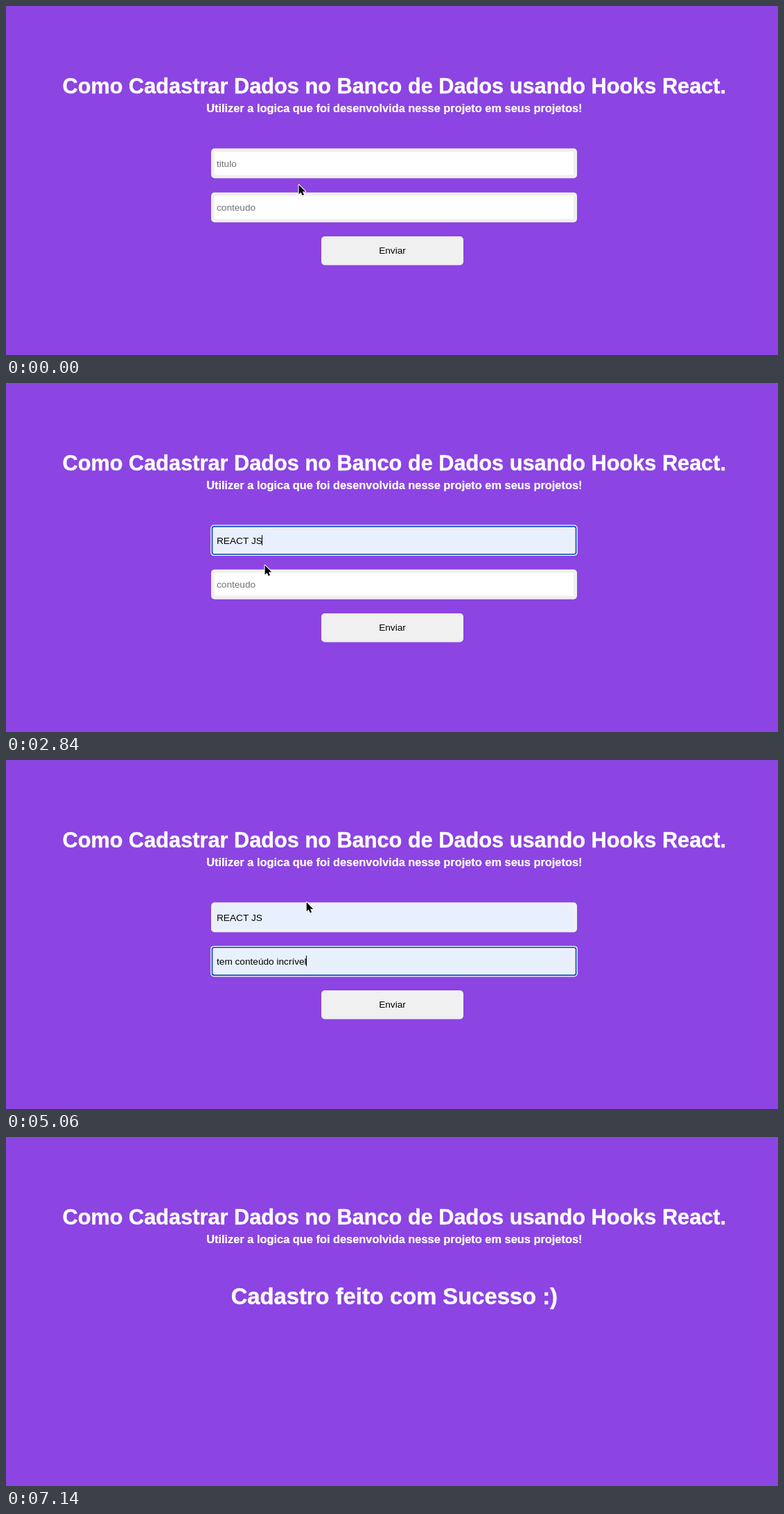
Animation, 1114 px wide and 503 px high, one loop 7.59 s. Source, as an HTML page with a canvas:

```html
<!DOCTYPE html>
<html lang="pt">
<head>
<meta charset="utf-8">
<title>Cadastro</title>
<style>
  html, body { margin: 0; height: 100%; overflow: hidden; background: #8c44e3; }
  canvas { display: block; }
</style>
</head>
<body>
<canvas id="stage" width="1114" height="503"></canvas>
<script>
const ctx = document.getElementById('stage').getContext('2d');
const LOOP = 7590, TICK = 148.6; // ms
const PURPLE = '#8c44e3', GREY = '#f0f0f0', AUTOFILL = '#e8f0fe';
const SANS = '"Liberation Sans", Arial, sans-serif';
const ZOOM = 1.024, CENTER = 560.3;
const INPUT_FONT = `${40 / 3 * ZOOM}px ${SANS}`;
const ROW = 33.6, POPUP_PAD = 7.8;

// Moments of the story, in ticks
const FOCUS_TITLE = 12, OPEN_TITLE = 13, PICK_TITLE = 19;
const FOCUS_BODY = 23, OPEN_BODY = 24, PICK_BODY = 33;
const CLICK_SEND = 39, SUCCESS = 40;

const field = (y, hint) => ({ x: 296, y, w: 528, h: 43, hint });
const popupAt = (y, rows) => ({ x: 296.3, y, w: 179, h: 216.7, rows });

const title = field(205.3, 'titulo');
const body = field(268.7, 'conteudo');
const button = { x: 455, y: 332, w: 205, h: 41.5 };
const titlePopup = popupAt(248.5, ['REACT JS', 'React', 'Hooks', 'dgdg', 'scsc', 'fsfs']);
const bodyPopup = popupAt(51.3, ['cscsc', 'tem conteúdo incrível', 'E muito bom', 'gdgdg', 'csc', 'fsfsf']);

// Pointer moves, each easing out from where the last one ended
const home = { x: 422, y: 257 };
const moves = [
  { from: 1, to: 5, x: 399, y: 238 },
  { from: 11, to: 12, x: 397, y: 230 },
  { from: 13, to: 17, x: 373, y: 262 },
  { from: 19, to: 23, x: 383, y: 289.5 },
  { from: 25, to: 31, x: 387, y: 112 },
  { from: 33, to: 38, x: 515, y: 368 },
  { from: 38, to: 39, x: 515, y: 360 },
  { from: 40, to: 42, x: 686, y: 444 },
  { from: 42, to: 43, x: 760, y: 540 },
  { from: 46, to: 47, x: 1108, y: 502 },
  { from: 47, to: 48, x: 1114, y: 540 }
];

const between = (tick, from, to) => tick >= from && tick < to;
const inside = (p, r) => p.x >= r.x && p.x < r.x + r.w && p.y >= r.y && p.y < r.y + r.h;
const easeOut = u => 1 - (1 - u) ** 2;

function pointerAt(tick) {
  return moves.reduce((p, { from, to, x, y }) => {
    const k = easeOut(Math.min(1, Math.max(0, (tick - from) / (to - from))));
    return { x: p.x + (x - p.x) * k, y: p.y + (y - p.y) * k };
  }, home);
}

function box(x, y, w, h, radius, color) {
  ctx.fillStyle = color;
  ctx.beginPath();
  ctx.roundRect(x, y, w, h, radius);
  ctx.fill();
}

function text(str, x, y, font, color, align = 'left') {
  ctx.font = font;
  ctx.fillStyle = color;
  ctx.textAlign = align;
  ctx.fillText(str, x, y);
}

// White headline, slightly thickened
function headline(str, y, size) {
  text(str, CENTER, y, `bold ${size * ZOOM}px ${SANS}`, '#fff', 'center');
  ctx.lineWidth = size / 70;
  ctx.lineJoin = 'round';
  ctx.strokeStyle = '#fff';
  ctx.strokeText(str, CENTER, y);
}

function drawField({ x, y, w, h, hint }, value, focused, caret) {
  const layer = (inset, radius, color) =>
    box(x + inset, y + inset, w - 2 * inset, h - 2 * inset, radius, color);
  if (focused) {
    layer(-0.8, 5, '#fff');
    layer(0.5, 4, '#1259c3');
    layer(2.4, 2, GREY);
  } else {
    layer(0, 5, GREY);
  }
  layer(5, 0, value ? AUTOFILL : '#fff');
  text(value || hint, x + 8, Math.round(y + 26.4), INPUT_FONT, value ? '#000' : '#717171');
  if (caret) {
    const caretX = Math.floor(x + 8 + (value ? ctx.measureText(value).width : 0));
    box(caretX, Math.round(y + 13.5), 1, 15, 0, '#000');
  }
}

function drawPopup({ x, y, w, h, rows }, hovered) {
  ctx.save();
  ctx.shadowColor = 'rgba(0,0,0,.2)';
  ctx.shadowBlur = 3;
  ctx.shadowOffsetY = 1.5;
  box(x, y, w, h, 4, '#fff');
  ctx.restore();
  rows.forEach((label, i) => {
    const top = y + POPUP_PAD + i * ROW;
    if (i === hovered) box(x, top, w, ROW, 0, '#c8c8c8');
    text(label, x + 11.5, Math.round(top + 21.2), '600 12px Inter, sans-serif', '#2a2b2e');
  });
}

function drawButton(hot) {
  box(button.x, button.y, button.w, button.h, 5, hot ? '#e8302f' : GREY);
  text('Enviar', 557.5, 357, (hot ? 'bold ' : '') + INPUT_FONT, hot ? '#fff' : '#000', 'center');
}

const arrowShape = new Path2D('M.6.8V14.2L3.6 11.4 5.7 16 8 15 6 10.5H10.2Z');
const beamShape = new Path2D('M-3-7Q-.3-7 0-5.5Q.3-7 3-7M0-5.5V5.5M-3 7Q-.3 7 0 5.5Q.3 7 3 7M-1.7 1H1.7');
const handShape = new Path2D('M-1.3 1Q0-.7 1.2 1L2 5Q3.6 3.8 4.4 5.4Q6 4.6 6.8 6.2Q8.6 5.8 9 7.6' +
  'Q9.6 10.6 7.8 13V15.3H1.2V13.8L-3 9.2Q-3.4 7.4-1.7 7.9L-.1 9Z');
const fingerLines = new Path2D('M2.6 9.5V13M4.6 9.5V13M6.5 9.5V13');

function stroke(path, width, color) {
  ctx.lineWidth = width;
  ctx.strokeStyle = color;
  ctx.stroke(path);
}

function drawPointer({ x, y }, kind) {
  ctx.save();
  ctx.translate(x, y);
  ctx.lineJoin = 'round';
  if (kind === 'beam') {
    ctx.translate(0.5, 0.5);
    stroke(beamShape, 2.6, 'rgba(255,255,255,.8)');
    stroke(beamShape, 1.2, '#000');
  } else if (kind === 'hand') {
    ctx.fillStyle = '#fff';
    ctx.fill(handShape);
    stroke(handShape, 1.2, '#000');
    stroke(fingerLines, 0.8, '#000');
  } else {
    stroke(arrowShape, 2, '#fff');
    ctx.fillStyle = '#000';
    ctx.fill(arrowShape);
  }
  ctx.restore();
}

function openPopup(tick) {
  if (between(tick, OPEN_TITLE, PICK_TITLE)) return titlePopup;
  if (between(tick, OPEN_BODY, PICK_BODY)) return bodyPopup;
  return null;
}

// The highlight trails the pointer by one tick
function hoveredRow(tick, popup) {
  const before = pointerAt(tick - 1);
  return popup && inside(before, popup) ? Math.floor((before.y - popup.y - POPUP_PAD) / ROW) : -1;
}

// Draws the form and returns the kind of pointer over it
function drawForm(tick, pointer) {
  const popup = openPopup(tick);
  const hovered = hoveredRow(tick, popup);
  const preview = popup?.rows[hovered] ?? '';
  const titleValue = tick >= PICK_TITLE ? titlePopup.rows[0] : popup === titlePopup ? preview : '';
  const bodyValue = tick >= PICK_BODY ? bodyPopup.rows[1] : popup === bodyPopup ? preview : '';
  const titleFocus = between(tick, FOCUS_TITLE, FOCUS_BODY);
  const bodyFocus = between(tick, FOCUS_BODY, CLICK_SEND);
  const onButton = inside(pointer, button);

  drawField(title, titleValue, titleFocus, titleFocus && !preview);
  drawField(body, bodyValue, bodyFocus, bodyFocus && !preview);
  drawButton(onButton);
  if (popup) drawPopup(popup, hovered);

  if (popup && inside(pointer, popup)) return 'arrow';
  if (onButton) return 'hand';
  return inside(pointer, title) || inside(pointer, body) ? 'beam' : 'arrow';
}

function draw(ms) {
  const tick = Math.floor(ms / TICK);
  const pointer = pointerAt(tick);
  box(0, 0, 1114, 503, 0, PURPLE);
  headline('Como Cadastrar Dados no Banco de Dados usando Hooks React.', 126, 30);
  headline('Utilizer a logica que foi desenvolvida nesse projeto em seus projetos!', 153, 16);

  let kind = 'arrow';
  if (tick < SUCCESS) kind = drawForm(tick, pointer);
  else headline('Cadastro feito com Sucesso :)', 241, 32);
  drawPointer(pointer, kind);
}

const start = performance.now();
function loop() {
  draw((performance.now() - start) % LOOP);
  requestAnimationFrame(loop);
}
loop();
</script>
</body>
</html>
```
